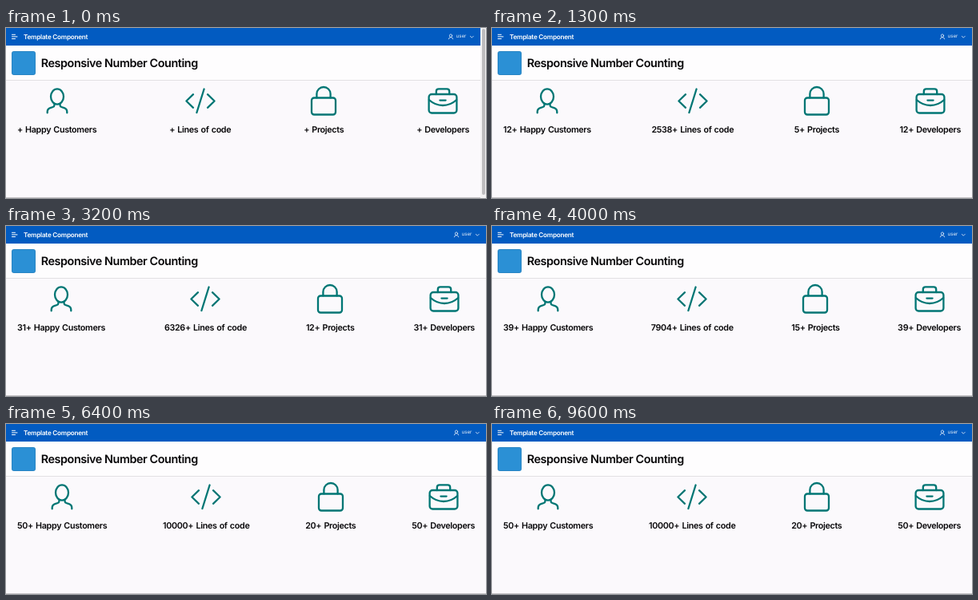
Animation of 600 by 213 pixels, one loop 9.7 s. Source, as an HTML page:

```html
<!DOCTYPE html>
<html lang="en">
<head>
<meta charset="utf-8">
<title>Responsive Number Counting</title>
<style>
  html, body { margin: 0; width: 100%; height: 100%; overflow: hidden; }
  body {
    position: relative;
    background: #fbf9fc;
    color: #060507;
    font-family: Inter, Roboto, sans-serif;
    text-rendering: geometricPrecision;
    white-space: nowrap;
  }
  svg { display: block; overflow: visible; fill: none; stroke-linecap: round; stroke-linejoin: round; }
  #page { position: absolute; inset: 0; }
  .scrolling #page { right: 7px; }

  header { position: absolute; inset: 0 0 auto; height: 22px; background: #025bc1; color: #fff; }
  header svg { position: absolute; top: 0; stroke: #fff; }
  .brand { position: absolute; left: 22px; top: 0; font: 600 8.17px/22px Inter, Roboto, sans-serif; letter-spacing: -.03em; }
  .account { position: absolute; right: 0; top: 0; width: 40px; height: 22px; }
  .account span { position: absolute; left: 9.5px; font-size: 6.2px; line-height: 22px; opacity: .9; }

  .hero { position: absolute; inset: 22px 0 auto; height: 43px; background: #fefdfe; border-bottom: 1px solid #e2e0e3; }
  .tile {
    position: absolute; left: 7px; top: 7px; width: 29.5px; height: 29.5px;
    border-radius: 3px; background: #2b90d5; box-shadow: inset 0 0 0 1px rgba(0, 0, 0, .08);
  }
  h1 { position: absolute; left: 43.7px; top: 13px; margin: 0; font-size: 14.4px; line-height: 20px; font-weight: 600; letter-spacing: -.03em; }

  main { position: absolute; inset: 70px 14px auto; display: flex; justify-content: space-between; }
  .stat { display: flex; flex-direction: column; align-items: center; }
  .stat svg { width: 40px; height: 42px; stroke: #007674; stroke-width: 2.3; }
  .stat div { margin-top: 8px; font-size: 10.75px; line-height: 16px; font-weight: 600; letter-spacing: -.03em; word-spacing: .07em; }

  .edge { position: absolute; inset: auto 0 0; height: 1px; background: #c6c4c7; }
  #scrollbar { display: none; position: absolute; inset: 0 0 0 auto; width: 7px; background: #f3f2f3; }
  #scrollbar::after { content: ""; position: absolute; inset: 1px 1px 4px 2px; border-radius: 2px; background: #bdbcbe; }
  .scrolling #scrollbar { display: block; }
</style>
</head>
<body>
<div id="page">
  <header>
    <svg width="22" height="22"><path d="M7.5 8.3h4M7.5 10.9h6.5M7.5 13.5h4"/></svg>
    <span class="brand">Template Component</span>
    <div class="account">
      <svg width="40" height="22" stroke-width=".7">
        <ellipse cx="3" cy="9.7" rx="1.6" ry="1.9"/>
        <path d="M.3 13.8q0-1.6 2.2-2.1h1q2.2.5 2.2 2.1M27.3 10.2l2 2 2-2"/>
      </svg>
      <span>user</span>
    </div>
  </header>
  <section class="hero">
    <div class="tile"></div>
    <h1>Responsive Number Counting</h1>
  </section>
  <main></main>
  <div class="edge"></div>
</div>
<div id="scrollbar"></div>
<script>
const LOOP = 9700, STEP = 100;

const stats = [
  { goal: 50, label: 'Happy Customers',
    icon: '<ellipse cx="0" cy="86" rx="8" ry="9.6"/>' +
          '<path d="M-12.3 106.3v-1.3q0-3.7 3.6-4.9l3.4-1.1q1.8-.6 1.8-2.4v-1.6M12.3 106.3v-1.3q0-3.7-3.6-4.9l-3.4-1.1q-1.8-.6-1.8-2.4v-1.6"/>' },
  { goal: 10000, label: 'Lines of code',
    icon: '<path d="M-9 83.2l-8.6 8.3 8.6 8.3M9 83.2l8.6 8.3-8.6 8.3M4.6 76.5l-9.2 29.5"/>' },
  { goal: 20, label: 'Projects',
    icon: '<rect x="-15" y="87.5" width="30" height="21" rx="3.2"/>' +
          '<path d="M-8.6 87.3v-4.7a8.6 8.6 0 0 1 17.2 0v4.7"/>' },
  { goal: 50, label: 'Developers',
    icon: '<rect x="-17.4" y="83" width="34.8" height="23.5" rx="3.5"/>' +
          '<path d="M-8.2 83v-3.6q0-3 3-3h10.4q3 0 3 3v3.6M-17.2 90q7.5 7 17.2 7t17.2-7M-3.6 90.6h7.2"/>' },
];

// Count progress: [ms, share of the goal], linear in between
const pace = [[20, 0], [1300, .2538], [2400, .4721], [3200, .6326], [4700, .9286], [5060, 1]];

function progress(t) {
  const i = pace.findIndex(([time]) => t <= time);
  if (i < 0) return 1;
  if (i === 0) return 0;
  const [t0, p0] = pace[i - 1], [t1, p1] = pace[i];
  return p0 + (p1 - p0) * (t - t0) / (t1 - t0);
}

const main = document.querySelector('main');
for (const stat of stats) {
  main.insertAdjacentHTML('beforeend',
    `<div class="stat"><svg viewBox="-20 70 40 42">${stat.icon}</svg><div></div></div>`);
  stat.text = main.lastElementChild.lastElementChild;
}

function render(now) {
  const t = Math.floor(now % LOOP / STEP) * STEP;
  const share = progress(t);
  document.body.classList.toggle('scrolling', t === 0);
  for (const { goal, label, text } of stats) {
    const count = t === 0 ? '' : Math.floor(goal * share + 1e-6);
    const content = `${count}+ ${label}`;
    if (text.textContent !== content) text.textContent = content;
  }
}

const start = performance.now();
function tick() {
  render(performance.now() - start);
  requestAnimationFrame(tick);
}
tick();
</script>
</body>
</html>
```
